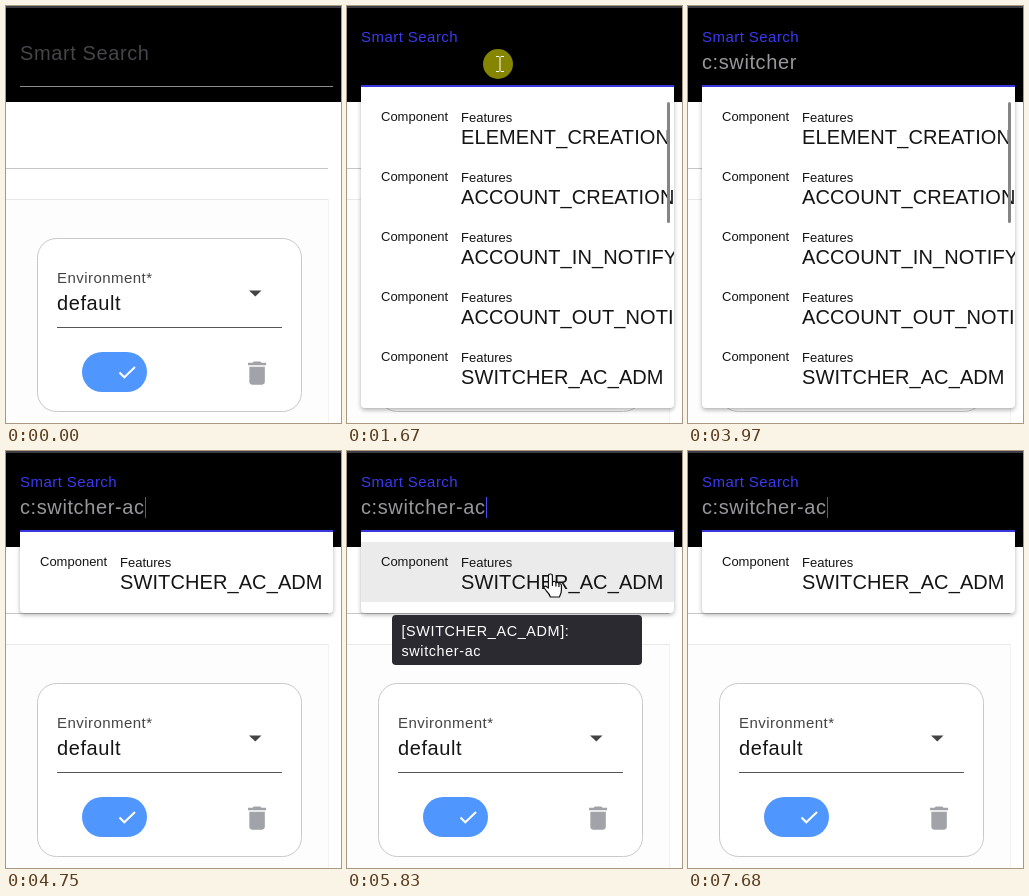
These frames come from a looping animation (335 px wide and 417 px high, 7840 ms). An HTML page:

```html
<!DOCTYPE html>
<html lang="en">
<head>
<meta charset="utf-8">
<title>Smart Search</title>
<style>
  html, body { margin: 0; width: 100%; height: 100%; overflow: hidden; background: #fff; }
  svg { display: block; width: 335px; height: 417px; }
  text { font: 20px "Liberation Sans", Arial, sans-serif; letter-spacing: .6px; fill: #151517; }
  text.label { font-size: 15px; letter-spacing: .45px; fill: #444; }
  text.small { font-size: 13px; letter-spacing: 0; }
  text.name { letter-spacing: .1px; font-kerning: normal; }
  text.tip { font-size: 14.4px; letter-spacing: .62px; fill: #fff; }
  #typed { fill: #98989c; }
  #panel { filter: drop-shadow(0 2px 2px rgba(0, 0, 0, .3)); }
</style>
</head>
<body>
<svg viewBox="0 0 335 417">
  <defs><clipPath id="clip"><rect x="14" y="81" width="313" height="336"/></clipPath></defs>

  <rect width="335" height="417" fill="#fff"/>
  <rect y="194" width="322" height="223" fill="#fdfdfd"/>
  <path d="M0 162.5H322" stroke="#c6c6c6"/>
  <path d="M0 193.5H322" stroke="#e8e8e8"/>
  <path d="M322.5 193V417" stroke="#f2f2f2"/>

  <rect x="31.5" y="232.5" width="264" height="173" rx="19" fill="#fff" stroke="#c9c9c9"/>
  <text class="label" x="51" y="277">Environment*</text>
  <text x="51" y="304">default</text>
  <path d="M243 284.5h12.5l-6.2 6z" fill="#444"/>
  <path d="M51 321.5H276" stroke="#555"/>
  <rect x="76" y="346" width="65" height="40" rx="20" fill="#5096ff"/>
  <path d="M113.5 366.5l4.8 4.8L129 361" fill="none" stroke="#fff" stroke-width="2"/>
  <path transform="translate(235.6 351.6) scale(1.29)" fill="#a2a3a8"
    d="M6 19c0 1.1.9 2 2 2h8c1.1 0 2-.9 2-2V7H6zM19 4h-3.5l-1-1h-5l-1 1H5v2h14z"/>

  <rect width="335" height="96" fill="#000"/>
  <rect width="335" height="2" fill="#3c3c42"/>
  <path d="M14 80.5H327" stroke="#8c8c8c"/>
  <text id="hint">Smart Search</text>
  <text id="typed" x="14" y="63"></text>
  <path id="caret" d="M139.5 46V67" stroke="#4c4cf0"/>

  <g id="panel">
    <path id="sheet" fill="#fff"/>
    <rect id="hover" x="14" y="91" width="313" height="60" fill="#ebebeb"/>
    <g id="rows" clip-path="url(#clip)"></g>
    <rect id="bar" x="320" y="96" width="3" height="121" rx="1.5" fill="#858585"/>
  </g>
  <path id="focus" d="M14 80H327" stroke="#3838e0" stroke-width="2"/>

  <g id="tip">
    <rect x="45" y="164" width="250" height="50" rx="4" fill="#2b2a31"/>
    <text class="tip" x="54.5" y="185">[SWITCHER_AC_ADM]:</text>
    <text class="tip" x="54.5" y="205">switcher-ac</text>
  </g>

  <g id="beam">
    <circle cx="-2" r="15" fill="#ff0" fill-opacity=".52"/>
    <path d="M-4 -7.5h3l1 1 1-1h3M-4 7.5h3l1-1 1 1h3M0 -6.5V6.5" fill="none" stroke="#fff"/>
  </g>
  <path id="hand" fill="#fff" stroke="#111" stroke-width="1.2" stroke-linejoin="round"
    d="M-2 2Q-2 0 0 0Q2 0 2 2V8Q5 6.5 5.5 9Q8 7.5 8.5 10Q11 9 11 12V16Q11 19 9 23H0Q-1 20 -4 17L-6.5 13.5Q-6 10.5 -2 14ZM2 8V12M5.5 9V12.5M8.5 10V13"/>
</svg>
<script>
const LOOP = 7840, STEP = 153.6, LEAD = 28;
const el = id => document.getElementById(id);
const names = ["ELEMENT_CREATION", "ACCOUNT_CREATION", "ACCOUNT_IN_NOTIFY", "ACCOUNT_OUT_NOTIFY", "SWITCHER_AC_ADM"];
const query = "c:switcher-ac";

const progress = (s, from, to) => Math.min(1, Math.max(0, (s - from) / (to - from)));
const easeOut = p => 1 - (1 - p) ** 2;
const mix = (a, b, p) => a + (b - a) * p;
const show = (id, on) => el(id).setAttribute("visibility", on ? "visible" : "hidden");

function place(id, on, x, y) {
  show(id, on);
  el(id).setAttribute("transform", `translate(${x} ${y})`);
}

const row = (name, i) => {
  const y = 81 + i * 60;
  return `<text class="small" x="34" y="${y + 34}">Component</text>` +
    `<text class="small" x="114" y="${y + 35}">Features</text>` +
    `<text class="name" x="114" y="${y + 57}">${name}</text>`;
};

function drawPanel(open, filtered) {
  const list = filtered ? names.slice(-1) : names;
  const h = (list.length * 60 + 21) * open;
  const fit = list.filter((name, i) => i * 60 + 60 < h);
  el("rows").innerHTML = fit.map(row).join("");
  el("sheet").setAttribute("d", h ? `M14 81H327v${h - 4}q0 4-4 4H18q-4 0-4-4z` : "");
  show("bar", open === 1 && !filtered);
}

// Typing starts slowly, then speeds up once past the prefix.
const typedCount = s =>
  s < 16 ? 0 : Math.floor(1 + 3 * progress(s, 16, 20) + 6 * progress(s, 20, 26) + 3 * progress(s, 26, 31));

function drawStep(s) {
  const lift = progress(s, 9, 11);
  const hint = el("hint");
  hint.setAttribute("transform", `translate(14 ${54 - 18 * lift}) scale(${1 - lift / 4})`);
  hint.style.fill = lift ? "#3a3af2" : "#46464a";
  show("focus", lift > 0);
  el("typed").textContent = query.slice(0, typedCount(s));
  show("caret", s >= 31 && s !== 48 && s !== 49);

  drawPanel(lift, s >= 30);
  show("hover", s >= 35 && s < 45);
  show("tip", s >= 38 && s < 45);

  const arrive = easeOut(progress(s, 2, 7));
  place("beam", s >= 3 && s < 13, mix(330, 153, arrive), mix(150, 58, arrive));

  const enter = easeOut(progress(s, 33, 36)), drift = progress(s, 36, 43);
  place("hand", s >= 34 && s < 45, mix(192, 202, enter) + 5 * drift, mix(168, 119, enter) + 14 * drift);
}

let last = -1;
function tick() {
  const s = Math.floor((performance.now() % LOOP + LEAD) / STEP);
  if (s !== last) drawStep(last = s);
  requestAnimationFrame(tick);
}
tick();
</script>
</body>
</html>
```
